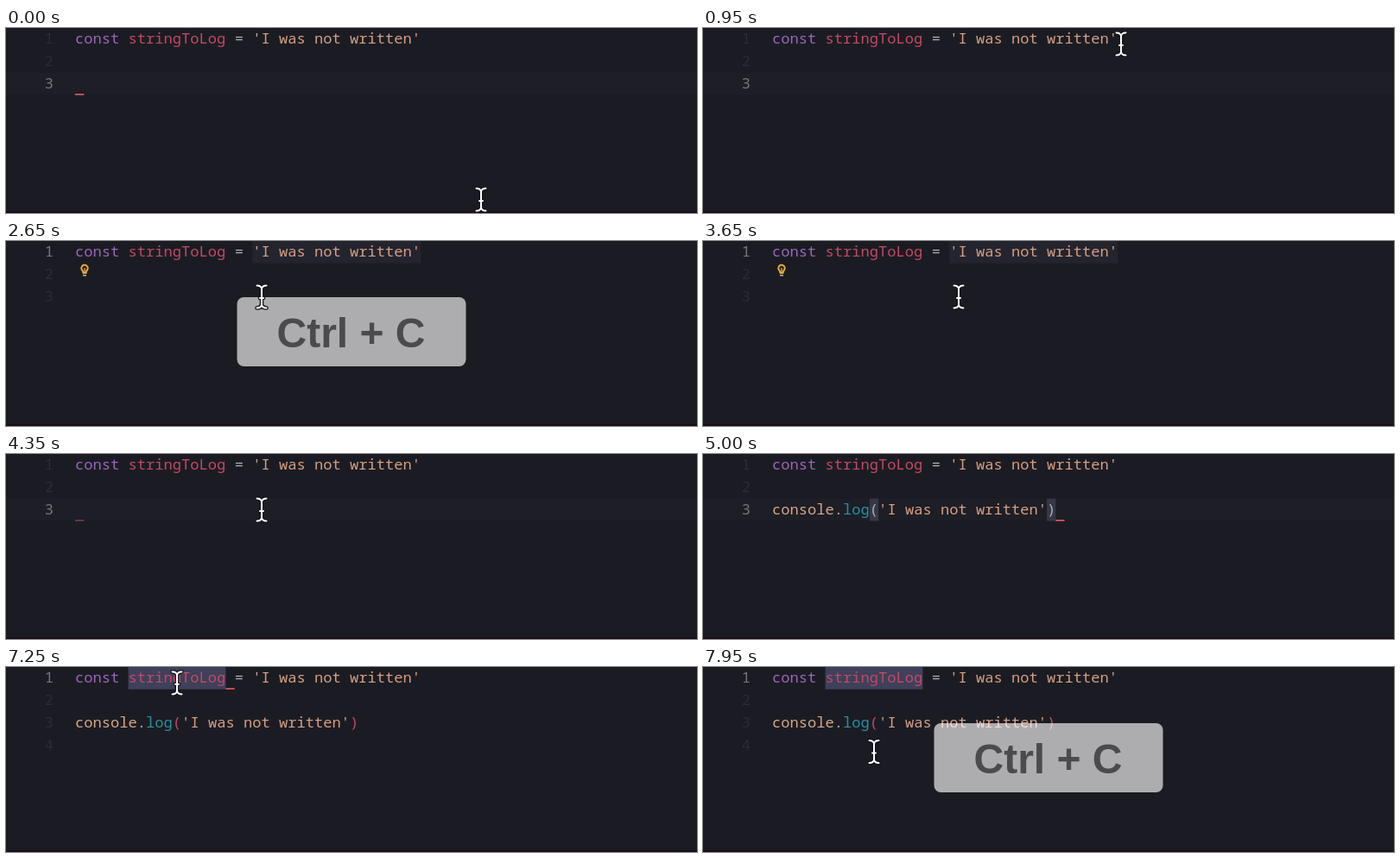
Write an HTML page with a canvas that moves like this. It is 800 px wide and 214 px high and loops after 8 s.

```html
<!DOCTYPE html>
<html lang="en">
<head>
<meta charset="utf-8">
<title>Copying in a code editor</title>
<style>
html, body { margin: 0; width: 100%; height: 100%; overflow: hidden; background: #1b1c23; }
canvas { display: block; }
</style>
</head>
<body>
<canvas id="stage" width="800" height="214"></canvas>
<script>
const ctx = document.getElementById('stage').getContext('2d');
const LOOP = 8000, SIZE = 17.1, PITCH = SIZE * 0.6, LEFT = 80, ROW = 25.8, BASE = 18.2;
const FONT = `${SIZE}px "Noto Sans Mono", "DejaVu Sans Mono", monospace`;
const C = {
  bg: '#1b1c23', line: '#1d1e26', edge: '#1c0e17', keyword: '#9c66ba', name: '#c44866',
  string: '#d69f84', object: '#d6a787', call: '#2692a0', plain: '#aeb0b3',
  numberOn: '#75777c', numberOff: '#2b2c34', cursor: '#e95670',
  marked: '#23242e', selected: '#3f405a', bracket: '#373845'
};
const QUOTE = "'I was not written'";
const DECLARATION = [['const ', C.keyword], ['stringToLog', C.name], [' = ', C.plain], [QUOTE, C.string]];

// Event times in ms
const PRESS = 1050, RELEASE = 1750, BULB = 2150, CLICK = 3870, TYPE = 4390, PASTE = 4830,
  END = 4950, ENTER = 5700, BACK = 6000, CLICK2 = 6760, DOUBLE = 7000;

// Pointer path: time, x, y
const PATH = [
  [50, 550, 198.5], [850, 484, 18.5], [PRESS, 484, 18.5], [1690, 294, 18.5], [1850, 294, 18.5],
  [2450, 296, 64.5], [BACK, 296, 64.5], [6350, 266, 52.5], [6720, 198, 18.5],
  [7690, 198, 18.5], [7930, 198, 98]
];

const clamp = (v, lo = 0, hi = 1) => Math.min(hi, Math.max(lo, v));
const ease = p => p * p * (3 - 2 * p);
const colX = col => LEFT + col * PITCH;

function pointerAt(t) {
  const next = PATH.findIndex(k => k[0] > t);
  if (next === 0) return PATH[0].slice(1);
  if (next < 0) return PATH[PATH.length - 1].slice(1);
  const [t0, x0, y0] = PATH[next - 1], [t1, x1, y1] = PATH[next];
  const p = ease((t - t0) / (t1 - t0));
  return [x0 + (x1 - x0) * p, y0 + (y1 - y0) * p];
}

function rect(x, y, w, h, color) {
  ctx.fillStyle = color;
  ctx.fillRect(x, y, w, h);
}

function cell(row, from, to, color) {
  rect(colX(from), row * ROW, (to - from) * PITCH, ROW, color);
}

function text(row, parts) {
  let col = 0;
  for (const [str, color] of parts) {
    ctx.fillStyle = color;
    ctx.fillText(str, colX(col), row * ROW + BASE);
    col += str.length;
  }
}

// Half a second on, half a second off, with short fades
function blink(age) {
  const p = age % 1000;
  if (p < 440) return age < 1000 ? 1 : clamp(p / 80);
  return 1 - clamp((p - 440) / 80);
}

function caret(t, typed, dragCol) {
  if (t < PRESS) return { row: 2, col: 0, since: 0 };
  if (t < RELEASE) return { row: 0, col: dragCol, since: t };
  if (t < CLICK) return { row: 0, col: 20, since: RELEASE };
  if (t < TYPE) return { row: 2, col: 0, since: CLICK };
  if (t < PASTE) return { row: 2, col: typed, since: t };
  if (t < END) return { row: 2, col: 31, since: PASTE };
  if (t < ENTER) return { row: 2, col: 32, since: END };
  if (t < CLICK2) return { row: 3, col: 0, since: ENTER };
  if (t < DOUBLE) return { row: 0, col: 11, since: CLICK2 };
  return { row: 0, col: 17, since: DOUBLE };
}

function call(t, typed) {
  const paren = t < ENTER ? C.plain : C.name;
  const word = 'console.log('.slice(0, typed);
  return [
    [word.slice(0, 7), C.object], [word.slice(7, 8), C.plain], [word.slice(8, 11), C.call],
    [word.slice(11), paren], [t < PASTE ? '' : QUOTE, C.string], [typed === 12 ? ')' : '', paren]
  ];
}

function bulb() {
  ctx.strokeStyle = '#e2ac3c';
  ctx.lineWidth = 2;
  ctx.beginPath();
  ctx.arc(91, 31.5, 3.7, 0.7 * Math.PI, 2.3 * Math.PI);
  ctx.lineTo(92.5, 37);
  ctx.lineTo(89.5, 37);
  ctx.closePath();
  ctx.stroke();
  rect(90.3, 31, 1.4, 5, '#e2ac3c');
  rect(89, 39, 4, 1.5, '#b8bac0');
}

function pointer(x, y) {
  ctx.save();
  ctx.translate(x, y);
  ctx.lineCap = 'round';
  for (const [color, width] of [['#14151b', 4.6], ['#fff', 2]]) {
    ctx.strokeStyle = color;
    ctx.lineWidth = width;
    ctx.beginPath();
    for (const side of [-1, 1]) {
      ctx.moveTo(side * 5.5, -13);
      ctx.quadraticCurveTo(side, -13, 0, -9.5);
      ctx.lineTo(0, 9.5);
      ctx.quadraticCurveTo(side, 13, side * 5.5, 13);
    }
    ctx.moveTo(-2, 1.5);
    ctx.lineTo(2, 1.5);
    ctx.stroke();
  }
  ctx.restore();
}

function keyBadge(alpha) {
  if (alpha <= 0) return;
  ctx.save();
  ctx.globalAlpha = alpha;
  ctx.fillStyle = 'rgba(255,255,255,.64)';
  ctx.beginPath();
  ctx.roundRect(267.5, 65, 265, 80, 8);
  ctx.fill();
  ctx.fillStyle = '#4b4b4d';
  ctx.font = 'bold 48px "Liberation Sans", Arial, sans-serif';
  ctx.textAlign = 'center';
  ctx.fillText('Ctrl + C', 399.5, 122.5);
  ctx.restore();
}

function draw(t) {
  const [mx, my] = pointerAt(t);
  const dragCol = clamp(Math.floor((mx - LEFT) / PITCH), 20, 39);
  const typed = t < TYPE ? 0 : clamp(Math.floor((t - TYPE) / 34) + 1, 0, 12);
  const cur = caret(t, typed, dragCol);
  const marking = t >= PRESS && t < CLICK;
  const wordSelected = t >= DOUBLE;

  rect(0, 0, 800, 214, C.bg);
  rect(0, 212, 800, 2, C.edge);

  // A selection replaces the current-line highlight
  if (marking) cell(0, cur.col, 39, C.marked);
  else if (wordSelected) cell(0, 6, 17, C.selected);
  else rect(0, cur.row * ROW, 800, ROW, C.line);

  if (typed === 12 && t < ENTER) {
    const close = t < PASTE ? 12 : 31;
    cell(2, 11, 12, C.bracket);
    cell(2, close, close + 1, C.bracket);
  }

  ctx.font = FONT;
  ctx.textAlign = 'right';
  const rows = t < ENTER ? 3 : 4;
  for (let i = 0; i < rows; i++) {
    ctx.fillStyle = i === cur.row ? C.numberOn : C.numberOff;
    ctx.fillText(i + 1, 55, i * ROW + BASE);
  }
  ctx.textAlign = 'left';
  text(0, DECLARATION);
  text(2, call(t, typed));

  ctx.globalAlpha = blink(t - cur.since);
  rect(colX(cur.col), cur.row * ROW + 24.4, PITCH, 1.6, C.cursor);
  ctx.globalAlpha = 1;

  if (t >= BULB && t < CLICK) bulb();
  keyBadge(Math.min(clamp((t - 2570) / 60), clamp((3560 - t) / 120)));
  keyBadge(clamp((t - 7400) / 60));
  if (t < TYPE || t >= BACK) pointer(mx, my);
}

const start = performance.now();
function frame() {
  draw((performance.now() - start) % LOOP);
  requestAnimationFrame(frame);
}
frame();
</script>
</body>
</html>
```
